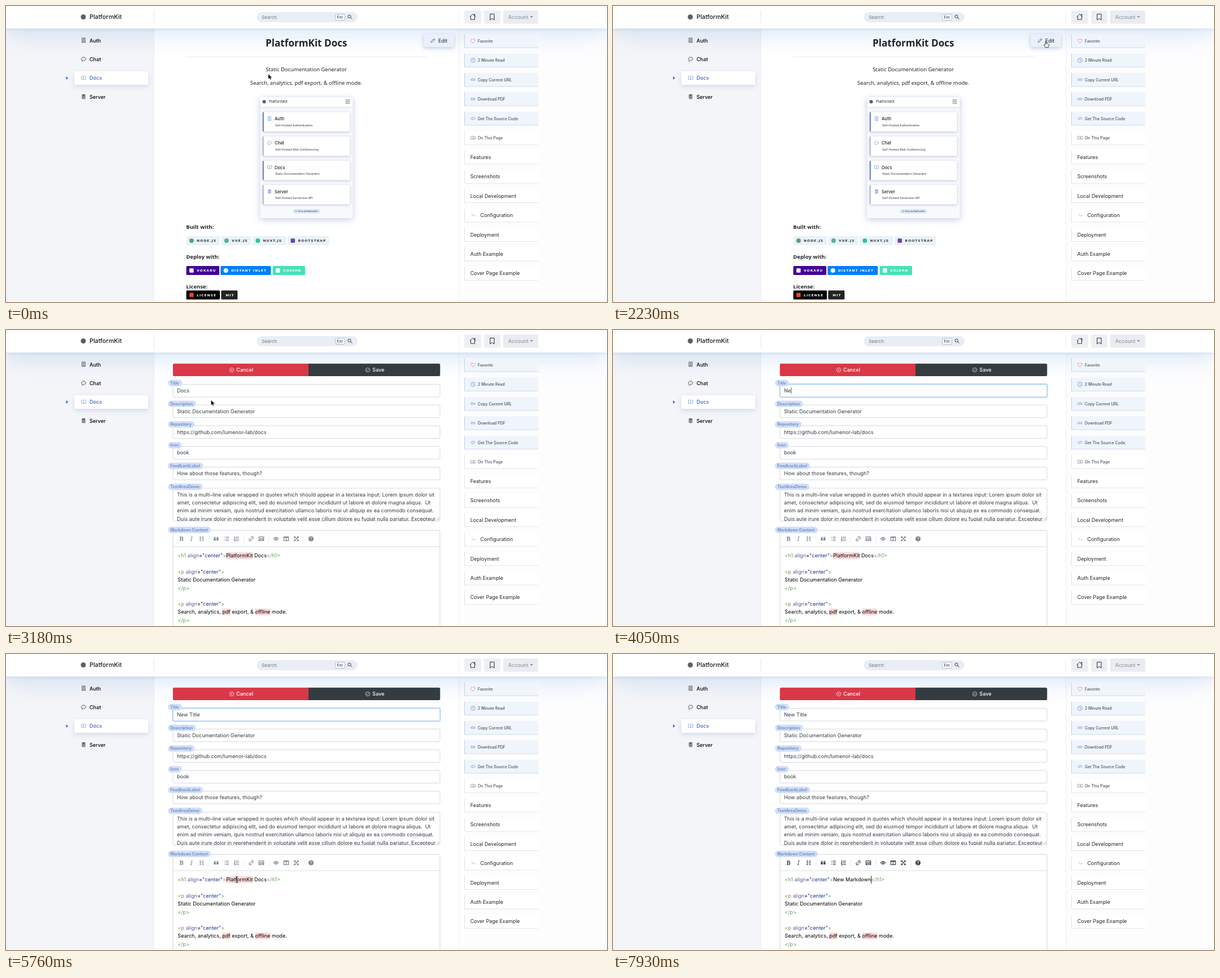
Animation of 1065 by 526 pixels, one loop 8 s. Source, as an HTML page with a canvas:

```html
<!DOCTYPE html>
<html lang="en">
<head>
<meta charset="utf-8">
<title>Docs editor</title>
<style>
html, body { margin: 0; width: 100%; height: 100%; overflow: hidden; background: #fff; }
canvas { display: block; }
</style>
</head>
<body>
<canvas id="stage" width="1065" height="526"></canvas>
<script>
const g = document.getElementById('stage').getContext('2d');
const LOOP = 8000, Z = 8;
const UI = 'Inter, "Liberation Sans", sans-serif';
const DOC = '"Noto Sans", "Open Sans", sans-serif';
const BADGE = '"DejaVu Sans", sans-serif';
const BODY = 9.1;

const clamp = v => Math.max(0, Math.min(1, v));
const ramp = (t, a, b) => clamp((t - a) / (b - a));

// Paths on a 16 unit grid
const ICONS = {
  home: 'M1.5 8.5L8 2L14.5 8.5M3.5 7V14.5H12.5V7M11.5 5V2.5H13V6.5',
  mark: 'M3.5 1.5H12.5V14.5L8 11.2L3.5 14.5Z',
  search: 'M11 6.5A4.7 4.7 0 1 1 1.6 6.5A4.7 4.7 0 1 1 11 6.5M10 10L15 15',
  person: 'M3 1H13V15H3ZM10 7A2 2 0 1 1 6 7A2 2 0 1 1 10 7M5 14C5 10 11 10 11 14M7 3H9',
  chat: 'M8 2C12 2 15 4.5 15 7.5S12 13 8 13L3 15L4 12C2 11 1 9.5 1 7.5S4 2 8 2M4.5 7.5h1M7.5 7.5h1M10.5 7.5h1',
  book: 'M8 4C6 2 3 2 1 3V13C3 12 6 12 8 14C10 12 13 12 15 13V3C13 2 10 2 8 4V14',
  data: 'M2 3.2C2 .5 14 .5 14 3.2S2 5.9 2 3.2ZM2 5C2 7.6 14 7.6 14 5V7C14 9.7 2 9.7 2 7ZM2 8.8C2 11.5 14 11.5 14 8.8V10.8C14 13.5 2 13.5 2 10.8ZM2 12.4C2 15 14 15 14 12.4V13.3C14 16.5 2 16.5 2 13.3Z',
  heart: 'M8 14.5C-4 7 3 -1.5 8 4C13 -1.5 20 7 8 14.5Z',
  clock: 'M15 8A7 7 0 1 1 1 8A7 7 0 1 1 15 8M8 3.5V8.5L11 10.5',
  link: 'M7 5H4.5A3 3 0 0 0 4.5 11H7M9 5H11.5A3 3 0 0 1 11.5 11H9M5 8H11',
  code: 'M5 4L1 8L5 12M11 4L15 8L11 12M9.5 2.5L6.5 13.5',
  list: 'M1 3H15V13H1ZM3.5 6H4.5M6.5 6H12.5M3.5 8H4.5M6.5 8H12.5M3.5 10H4.5M6.5 10H12.5',
  turn: 'M2 1V10H14M10.5 6.5L14 10L10.5 13.5',
  pencil: 'M2 14L3 10L11.5 1.5L14.5 4.5L6 13ZM9.5 3.5L12.5 6.5',
  cross: 'M15 8A7 7 0 1 1 1 8A7 7 0 1 1 15 8M5.5 5.5L10.5 10.5M10.5 5.5L5.5 10.5',
  check: 'M15 8A7 7 0 1 1 1 8A7 7 0 1 1 15 8M4.5 8L7 10.5L11.5 5.5',
  ul: 'M1 3H3M1 8H3M1 13H3M5.5 3H15M5.5 8H15M5.5 13H15',
  ol: 'M1 2H2.3V5M1 7H3L1 9.5H3M1 12H3V15H1M5.5 3H15M5.5 8H15M5.5 13H15',
  chain: 'M6.5 9.5L9.5 6.5M7 4.5L9 2.5C12 0 16 4 13.5 7L11.5 9M9 11.5L7 13.5C4 16 0 12 2.5 9L4.5 7',
  image: 'M1 2.5H15V13.5H1ZM2 12L6 7.5L8.5 10L11 6.5L14 11.5M4.5 5.5H5',
  eye: 'M.8 8C4 2.2 12 2.2 15.2 8C12 13.8 4 13.8 .8 8M10 8A2 2 0 1 1 6 8A2 2 0 1 1 10 8',
  cols: 'M1 2.5H15V13.5H1ZM8 2.5V13.5M1 4H15',
  full: 'M2 6V2H6M10 2H14V6M14 10V14H10M6 14H2V10M3 3L13 13M13 3L3 13',
  quote: 'M1 6C1 3.5 3 2.5 6.5 2V4C5 4.3 4.5 5 4.5 7H7V13H1ZM9 6C9 3.5 11 2.5 14.5 2V4C13 4.3 12.5 5 12.5 7H15V13H9Z',
};
for (const k in ICONS) ICONS[k] = new Path2D(ICONS[k]);
const SOLID = ['data', 'quote'];

function icon(name, cx, cy, size, color, line = 1.3) {
  g.save();
  g.translate(cx - size / 2, cy - size / 2);
  g.scale(size / 16, size / 16);
  g.strokeStyle = g.fillStyle = color;
  g.lineWidth = line;
  if (SOLID.includes(name)) g.fill(ICONS[name]);
  else g.stroke(ICONS[name]);
  g.restore();
}

// Text centred vertically on y; returns its width
function text(s, x, y, size, color, { w = 400, f = UI, align = 'left', gap = 0, style = '' } = {}) {
  g.save();
  g.translate(x, y + size * .36);
  g.scale(1 / Z, 1 / Z);
  g.font = `${style} ${w} ${size * Z}px ${f}`;
  g.letterSpacing = gap * Z + 'px';
  g.textAlign = align;
  g.fillStyle = color;
  g.fillText(s, 0, 0);
  const width = g.measureText(s).width / Z;
  g.restore();
  return width;
}
const widthOf = (s, size, opt) => text(s, -2000, 0, size, '#000', opt);

function box(x, y, w, h, fill, r = 0, stroke) {
  g.beginPath();
  g.roundRect(x, y, w, h, r);
  if (fill) { g.fillStyle = fill; g.fill(); }
  if (stroke) { g.strokeStyle = stroke; g.lineWidth = 1; g.stroke(); }
}
function raised(x, y, w, h, fill, r, shade, blur, dy) {
  g.save();
  g.shadowColor = shade;
  g.shadowBlur = blur;
  g.shadowOffsetY = dy;
  box(x, y, w, h, fill, r);
  g.restore();
}
function dot(x, y, r, color) {
  g.beginPath();
  g.arc(x, y, r, 0, 7);
  g.fillStyle = color;
  g.fill();
}
function poly(color, ...p) {
  g.beginPath();
  for (let i = 0; i < p.length; i += 2) g.lineTo(p[i], p[i + 1]);
  g.fillStyle = color;
  g.fill();
}

function frame() {
  box(0, 0, 1065, 526, '#fff');
  box(0, 40, 262, 486, '#f4f5f8');
  box(803, 40, 262, 486, '#fdfdfe');
  box(261.5, 40, 1, 486, '#e9edf3');
  box(802.5, 40, 1, 486, '#eceff4');
  raised(0, 0, 1065, 40, '#fff', 0, 'rgba(60,135,225,.26)', 46, 4);
  raised(0, 0, 1065, 40, '#fff', 0, 'rgba(60,100,150,.14)', 7, 1);

  dot(137, 19.5, 4.5, '#5c5f64');
  text('PlatformKit', 148, 19.5, 10.75, '#16191c', { w: 500 });
  box(261.5, 8, 1, 24, '#e3e7ec');
  box(802, 8, 1, 24, '#eef0f4');
  box(444.5, 11, 178.5, 18, '#e9eef4', 9);
  text('Search', 453, 20, 8.2, '#6c757d');
  box(583.5, 14.5, 17, 11, '#f3f6fa', 2, '#b4c0ce');
  text('Esc', 592, 19.8, 6.3, '#495057', { w: 500, align: 'center' });
  icon('search', 609.5, 19.5, 9, '#222', 1.6);
  box(812, 8, 30, 23.5, '#eceff4', 2);
  icon('home', 827, 19, 12.5, '#222', 1.2);
  box(847, 8, 29, 23.5, '#eceff4', 2);
  icon('mark', 861.5, 19.5, 13, '#222', 1.2);
  box(881, 8, 62, 23.5, '#e9ecf0', 2);
  text('Account', 890, 19.8, 9.05, '#868c93');
  poly('#868c93', 928.5, 18, 934, 18, 931.2, 21);
}

function sidebar() {
  raised(121, 116, 131, 24, '#fff', 2, 'rgba(70,110,180,.2)', 8, 3);
  poly('#2f5fc9', 106.5, 125, 110, 128, 106.5, 131);
  [['person', 'Auth'], ['chat', 'Chat'], ['book', 'Docs'], ['data', 'Server']].forEach(([ic, s], i) => {
    const y = 61.3 + i * 33.4, on = i === 2;
    icon(ic, 137.5, y - .5, 9, on ? '#7f9bd6' : '#333', 1.4);
    text(s, 148, y, 9, on ? '#3f63bd' : '#000', { w: 500 });
  });
}

function panel() {
  const tools = [['heart', 'Favorite', '#e0709c'], ['clock', '2 Minute Read', '#5c80cc'], ['link', 'Copy Current URL', '#5c80cc'],
    ['link', 'Download PDF', '#5c80cc'], ['code', 'Get The Source Code', '#5c80cc'], ['list', 'On This Page', '#999']];
  const links = ['Features', 'Screenshots', 'Local Development', 'Configuration', 'Deployment', 'Auth Example', 'Cover Page Example'];
  for (let i = 0; i < 13; i++) {
    const y = 50 + i * 34.45, blue = i < 5;
    box(812, y, 131.5, 24.5, blue ? '#f0f5fc' : '#fff', 2);
    box(812, y, 1, 24.5, blue ? '#c6d1e1' : '#dde2e9', 1);
    box(812.5, y + 23.5, 131, 1, blue ? '#d2dcea' : '#e2e6ec');
    if (i < 6) {
      const [ic, s, c] = tools[i];
      icon(ic, 827.5, y + 12, 9, c);
      text(s, 836, y + 12.3, 6.98, '#4a5058', { w: 500 });
    } else {
      const deep = i === 9;
      if (deep) icon('turn', 829, y + 11.5, 8, '#b3bac4');
      text(links[i - 6], deep ? 840.5 : 822.7, y + 11.8, 8.97, '#212529');
    }
  }
}

function badge(x, y, w, fill, s, color, mark, square) {
  box(x, y, w, 16, fill, 1.5);
  if (mark) square ? box(x + 5.5, y + 4.2, 7.5, 7.5, mark, 1) : dot(x + 9.3, y + 8, 4, mark);
  text(s, x + (mark ? 18.6 : 8), y + 8.2, 5.9, color, { w: 700, f: BADGE, gap: 1.05 });
}

function card() {
  raised(450.5, 162, 164, 215, '#f7f9fc', 2, 'rgba(50,80,160,.28)', 12, 3);
  raised(450.5, 162, 164, 17, '#fff', 2, 'rgba(60,100,170,.15)', 5, 1);
  dot(457.5, 170, 3.1, '#5c5f64');
  text('PlatformKit', 466, 170, 6.3, '#222');
  for (let i = 0; i < 3; i++) box(601.5, 166.5 + i * 2.9, 8, .9, '#555');
  [['person', 'Auth', 'Self-Hosted Authentication'], ['chat', 'Chat', 'Self-Hosted Web Conferencing'],
    ['book', 'Docs', 'Static Documentation Generator'], ['data', 'Server', 'Self-Hosted Serverless API']].forEach(([ic, a, b], i) => {
    const y = 188.5 + i * 43.2;
    raised(455, y, 154.5, 34.5, '#fff', 1.5, 'rgba(60,80,130,.32)', 4, 1);
    box(455, y, 1.6, 34.5, i % 2 ? '#a3afcb' : '#4a69ae', 1);
    icon(ic, 467, y + 11.5, 8, '#6f92db');
    text(a, 476, y + 12, 7.55, '#222', { w: 500 });
    text(b, 477, y + 23.3, 5.2, '#333');
  });
  box(508.5, 361, 48, 7.5, '#dbe6f7', 3.7);
  icon('book', 514, 364.8, 4, '#5c80cc');
  text('Docs by PlatformKit', 518, 364.8, 3.55, '#3f557f', { w: 600 });
}

function docs() {
  const mid = { f: DOC, align: 'center' }, bold = { f: DOC, w: 700 };
  text('PlatformKit Docs', 532.3, 65.7, 17.1, '#212529', { ...mid, w: 700 });
  raised(740, 50, 54, 23, '#e9f0f9', 2, 'rgba(60,90,150,.3)', 6, 2);
  icon('pencil', 756.5, 61.5, 8.5, '#333');
  text('Edit', 766, 61.7, 9.1, '#212529');
  box(319, 90, 427, 1, '#e6e9ee');
  text('Static Documentation Generator', 532, 113, 9.45, '#212529', mid);
  text('Search, analytics, pdf export, & offline mode.', 532, 137, 9.45, '#212529', mid);
  card();
  text('Built with:', 319.3, 392.5, 9.45, '#212529', bold);
  text('Deploy with:', 319.3, 445.5, 9.45, '#212529', bold);
  text('License:', 319.3, 498.3, 9.45, '#212529', bold);
  const pale = '#eaf2f9', ink = '#333';
  badge(319.5, 409, 59.5, pale, 'NODE.JS', ink, '#5fa36a');
  badge(381.5, 409, 53, pale, 'VUE.JS', ink, '#4fb98a');
  badge(437, 409, 59.5, pale, 'NUXT.JS', ink, '#2fc98b');
  badge(499, 409, 73.5, pale, 'BOOTSTRAP', ink, '#6f42b0', true);
  badge(319.5, 462, 58.5, '#430098', 'VOKARU', '#fff', '#fff', true);
  badge(380.3, 462, 89, '#0080ff', 'DISTANT INLET', '#fff', '#fff');
  badge(472.5, 462, 57.5, '#46e3b7', 'SOLVAN', '#fff', '#fff', true);
  badge(319.5, 505.5, 59.5, '#000', 'LICENSE', '#fff', '#e8482f', true);
  badge(381.3, 505.5, 29, '#222', 'MIT', '#fff');
}

const titleKeys = [3930, 4050, 4270, 4320, 4490, 4570, 4740, 4820, 4900];
const markKeys = [6630, 7030, 7100, 7160, 7230, 7300, 7360, 7580, 7670, 7760, 7850, 7930];
const typed = (s, keys, t) => s.slice(0, keys.filter(k => k <= t).length);
const caretOn = (keys, t) => {
  const last = keys.filter(k => k <= t).pop();
  return last !== undefined && (t - last) % 1000 < 500;
};

function pill(s, y) {
  const opt = { w: 700 };
  box(287, y - 5.7, widthOf(s, 7.1, opt) + 9.5, 11.4, '#cfdff8', 5.7);
  text(s, 291.2, y, 7.1, '#7590c2', opt);
}

function field(i, label, value, t) {
  const y = 96.5 + i * 36.8, focus = i ? 0 : ramp(t, 3430, 3580) * (1 - ramp(t, 5790, 5900));
  if (focus) {
    g.save();
    g.globalAlpha *= focus;
    box(294.3, y - 1.7, 476.4, 25.9, '#cde1fb', 4);
    g.restore();
  }
  box(296, y, 473, 22.5, '#fff', 2.5, focus > .5 ? '#97c0f5' : '#d3d8de');
  if (i === 0 && t >= 3550 && t < 3930) box(303, y + 5, widthOf(value, BODY), 12.5, '#b5d6fc');
  const w = text(value, 303, y + 11.3, BODY, '#343a40');
  if (i === 0 && t < 5800 && caretOn(titleKeys, t)) box(303.3 + w, y + 5.5, .8, 11.5, '#333');
  pill(label, y - 2.2);
}

function toolbar(t) {
  g.save();
  g.globalAlpha *= .65 + .35 * ramp(t, 5800, 6100);
  const c = '#3f4854', y = 371;
  const serif = { f: '"Noto Serif", serif', align: 'center' };
  text('B', 311, y, 11, c, { ...serif, w: 700 });
  text('I', 328.5, y, 11, c, { ...serif, style: 'italic' });
  text('H', 346.5, y, 11, c, { ...serif, w: 500 });
  const icons = { quote: 372.5, ul: 390.7, ol: 408.7, chain: 434.5, image: 452.5, eye: 478.5, cols: 496.5, full: 514.5 };
  for (const k in icons) icon(k, icons[k], y, 9.5, c, 2.1);
  dot(540.5, y, 4.6, c);
  text('?', 540.5, y, 7, '#fff', { w: 700, align: 'center' });
  for (const x of [360, 421, 466, 528]) box(x - .5, 364.5, 1, 13, '#dfe3e8');
  g.restore();
}

const TAG = '#5f9f58', ATTR = '#6a55a8', STR = '#183691', INK = '#000';
const open = tag => [['<' + tag + ' ', TAG], ['align', ATTR], ['=', INK], ['"center"', STR], ['>', TAG]];

// Runs are [text, colour, misspelt]; returns the end x
function codeLine(runs, y, x = 304.3) {
  for (const [s, color, bad] of runs) {
    if (bad) box(x, y - 6, widthOf(s, BODY), 12, 'rgba(255,0,0,.15)');
    x += text(s, x, y, BODY, color);
  }
  return x;
}

function editor(t) {
  box(296, 356, 473, 180, '#fff', 2.5, '#ced4da');
  box(296, 384.5, 473, 1, '#d8dde3');
  toolbar(t);
  pill('Markdown Content', 355.3);

  const y = 401, x = codeLine(open('h1'), y);
  let end;
  if (t < 6630) {
    const part = t >= 6480 ? 'PlatformKit Docs' : t >= 5980 ? 'PlatformKit' : '';
    if (part) box(x, y - 7, widthOf(part, BODY), 14, '#d7d4f0');
    end = codeLine([['PlatformKit', INK, true], [' Docs', INK]], y, x);
    if (t >= 5830 && t < 5980) box(409, y - 6.5, .9, 13, '#111');
  } else {
    end = codeLine([[typed('New Markdown', markKeys, t), INK]], y, x);
  }
  codeLine([['</h1>', TAG]], y, end);
  if (caretOn(markKeys, t)) box(end, y - 7, .9, 14, '#111');

  codeLine(open('p'), 429.7);
  codeLine([['Static Documentation Generator', INK]], 444);
  codeLine([['</p>', TAG]], 458.3);
  codeLine(open('p'), 486.8);
  codeLine([['Search, analytics, ', INK], ['pdf', INK, true], [' export, & ', INK], ['offline', INK, true], [' mode.', INK]], 501);
  codeLine([['</p>', TAG]], 515.3);
}

function form(t) {
  box(295.7, 59.7, 240.8, 22.2, '#d93849', [2.5, 0, 0, 2.5]);
  box(536, 59.7, 233.3, 22.2, '#343c42', [0, 2.5, 2.5, 0]);
  icon('cross', 400, 71, 8.5, '#fff');
  text('Cancel', 408, 71, 9.05, '#fff', { w: 500 });
  icon('check', 641, 71, 8.5, '#fff');
  text('Save', 649.3, 71, 9.05, '#fff', { w: 500 });

  [['Title', t < 3930 ? 'Docs' : typed('New Title', titleKeys, t)], ['Description', 'Static Documentation Generator'],
    ['Repository', 'https://github.com/lumenor-lab/docs'], ['Icon', 'book'],
    ['FeedbackLabel', 'How about those features, though?']].forEach(([a, b], i) => field(i, a, b, t));

  box(296, 281, 473, 58.5, '#fff', 2.5, '#d3d8de');
  g.save();
  g.beginPath();
  g.rect(296, 281, 473, 58);
  g.clip();
  ['This is a multi-line value wrapped in quotes which should appear in a textarea input: Lorem ipsum dolor sit',
    'amet, consectetur adipiscing elit, sed do eiusmod tempor incididunt ut labore et dolore magna aliqua.  Ut',
    'enim ad minim veniam, quis nostrud exercitation ullamco laboris nisi ut aliquip ex ea commodo consequat.',
    'Duis aute irure dolor in reprehenderit in voluptate velit esse cillum dolore eu fugiat nulla pariatur. Excepteur'
  ].forEach((s, i) => text(s, 303, 292.4 + i * 14.3, BODY, '#343a40'));
  g.restore();
  g.beginPath();
  g.moveTo(763, 338); g.lineTo(768, 333);
  g.moveTo(766, 338); g.lineTo(768, 336);
  g.strokeStyle = '#888';
  g.lineWidth = .7;
  g.stroke();
  pill('TextAreaDemo', 278.8);
  editor(t);
}

// Pointer track: time, x, y
const track = [
  [0, 465, 121], [1450, 465, 121], [1500, 609, 92], [1550, 675, 82], [1790, 675, 82], [2080, 767, 63], [3000, 767, 63],
  [3050, 720, 72], [3110, 560, 100], [3180, 364, 125], [3250, 325, 112], [3320, 314, 108], [4980, 352, 122],
  [5140, 360, 140], [5500, 395, 330], [5700, 409, 401], [6000, 409, 401], [6210, 458, 401], [8000, 458, 401]
];
const arrow = new Path2D('M0 0V8.6L2 6.8L3.4 9.8L4.8 9.2L3.5 6.3H6.2Z');
const hand = new Path2D('M-.9 6V.8C-.9 -.4 .9 -.4 .9 .8V4C1.5 3.3 2.4 3.6 2.5 4.3C3.2 3.8 4 4.1 4.1 4.9C4.9 4.6 5.4 5 5.4 5.8C5.4 8 5 9 4.3 10.6H-.6C-1.2 9.3 -2.5 8 -3.3 6.6C-3.6 5.6 -2.4 5.2 -1.7 6Z');

function pointer(t) {
  if ((t >= 3930 && t < 4990) || t >= 6630) return;
  const i = track.findIndex(k => k[0] > t), [a, x0, y0] = track[i - 1], [b, x1, y1] = track[i];
  const k = ramp(t, a, b), x = x0 + (x1 - x0) * k, y = y0 + (y1 - y0) * k;
  g.save();
  g.translate(x, y);
  g.lineJoin = 'round';
  if ((t >= 3240 && t < 3930) || t >= 5140) {
    g.beginPath();
    g.moveTo(-2, -5.5); g.quadraticCurveTo(0, -5.5, 0, -4);
    g.lineTo(0, 4); g.quadraticCurveTo(0, 5.5, -2, 5.5);
    g.moveTo(2, -5.5); g.quadraticCurveTo(0, -5.5, 0, -4);
    g.moveTo(0, 4); g.quadraticCurveTo(0, 5.5, 2, 5.5);
    g.strokeStyle = '#222';
    g.lineWidth = 1;
    g.stroke();
  } else if (t >= 1980 && t < 3040) {
    g.fillStyle = '#fff';
    g.fill(hand);
    g.strokeStyle = '#222';
    g.lineWidth = .9;
    g.stroke(hand);
  } else {
    g.strokeStyle = '#fff';
    g.lineWidth = 1.4;
    g.stroke(arrow);
    g.fillStyle = '#111';
    g.fill(arrow);
  }
  g.restore();
}

function faded(alpha, draw) {
  if (alpha <= 0) return;
  g.save();
  g.globalAlpha = alpha;
  draw();
  g.restore();
}

function paint(t) {
  frame();
  sidebar();
  panel();
  faded(1 - ramp(t, 2300, 2590), docs);
  faded(ramp(t, 2620, 2900), () => form(t));
  pointer(t);
}

const start = performance.now();
function tick() {
  paint((performance.now() - start) % LOOP);
  requestAnimationFrame(tick);
}
tick();
</script>
</body>
</html>
```
